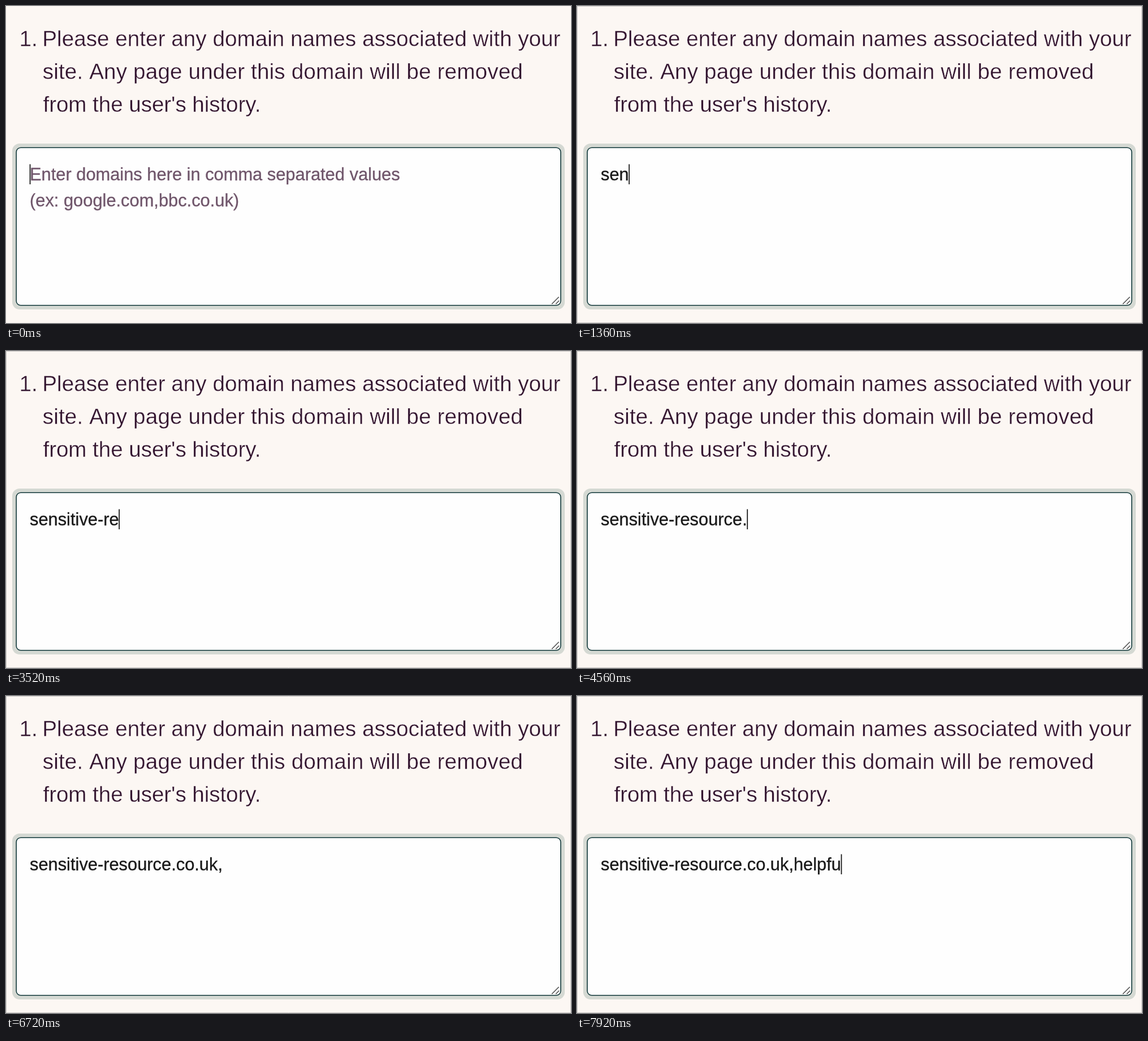
An HTML page with a canvas that plays this animation: 999 by 560 pixels, repeating every 8000 ms.

```html
<!DOCTYPE html>
<html lang="en">
<head>
<meta charset="utf-8">
<title>Domain entry</title>
<style>
  html, body { margin: 0; width: 100%; height: 100%; overflow: hidden; background: #fcf7f3; }
  canvas { display: block; }
</style>
</head>
<body>
<canvas id="stage" width="999" height="560"></canvas>
<script>
const ctx = document.getElementById('stage').getContext('2d');
const LOOP = 8000, BLINK = 480, FOCUS_AT = 240, EDGE_AT = 720;
const PAPER = '#fcf7f3';
const FAMILY = '"Liberation Sans", Arial, sans-serif';
const HEADING_FONT = '38.7px ' + FAMILY;
const FIELD_FONT = '30.83px ' + FAMILY;
const TEXT_X = 42, BASELINE = 308, LINE = 46.3;

const typed = 'sensitive-resource.co.uk,helpfu';
const keyTimes = [
  1120, 1280, 1360, 1600, 1840, 1920, 2080, 2720, 2880, 3200,
  3360, 3520, 3600, 3760, 3840, 4000, 4320, 4400, 4560, 4800,
  4960, 5280, 5600, 5760, 6240, 7200, 7280, 7440, 7600, 7760, 7920
];

// text, x, baseline, tracking
const heading = [
  ['1.', 23.5, 70.5, 0],
  ['Please enter any domain names associated with your', 64.3, 70.5, 0],
  ['site. Any page under this domain will be removed', 64.7, 128.5, 0.13],
  ["from the user's history.", 65.5, 186.5, -0.1]
];

function roundBox(x, y, w, h, r, color) {
  ctx.fillStyle = color;
  ctx.beginPath();
  ctx.roundRect(x, y, w, h, r);
  ctx.fill();
}

// An outline in the paper colour slims the letters; one in their own colour thickens them.
function weightedText(text, x, y, fill, outline, width) {
  ctx.fillStyle = fill;
  ctx.strokeStyle = outline;
  ctx.lineWidth = width;
  ctx.lineJoin = 'round';
  ctx.fillText(text, x, y);
  ctx.strokeText(text, x, y);
}

function drawHeading() {
  ctx.font = HEADING_FONT;
  for (const [text, x, y, tracking] of heading) {
    ctx.letterSpacing = tracking + 'px';
    weightedText(text, x, y, '#32142f', PAPER, 0.4);
  }
  ctx.letterSpacing = '0px';
}

function drawField() {
  roundBox(11, 243, 977, 293, 13, '#d5d9d3');
  roundBox(17.4, 249.4, 964.2, 280.2, 8.6, '#12383a');
  roundBox(19, 251, 961, 277, 7, '#fefefe');
  ctx.strokeStyle = '#4a4a4a';
  ctx.lineWidth = 1.5;
  ctx.beginPath();
  ctx.moveTo(965, 526.5);
  ctx.lineTo(977.5, 514);
  ctx.moveTo(972, 526.5);
  ctx.lineTo(978, 520.5);
  ctx.stroke();
}

function drawEntry(t) {
  const count = keyTimes.filter(k => k <= t).length;
  const text = typed.slice(0, count);
  const write = (line, y, color) => weightedText(line, TEXT_X, y, color, color, 0.35);
  ctx.font = FIELD_FONT;
  if (count) {
    write(text, BASELINE, '#1a1a1a');
  } else {
    write('Enter domains here in comma separated values', BASELINE, '#70566b');
    write('(ex: google.com,bbc.co.uk)', BASELINE + LINE, '#70566b');
  }
  const idle = Math.max(0, t - (count ? keyTimes[count - 1] : FOCUS_AT));
  if (Math.floor(idle / BLINK) % 2 === 0) {
    const x = TEXT_X + ctx.measureText(text).width - 0.3;
    ctx.fillStyle = '#101010';
    ctx.fillRect(x, 279.5, 1.7, 35.5);
  }
}

function draw(t) {
  ctx.fillStyle = PAPER;
  ctx.fillRect(0, 0, 999, 560);
  drawHeading();
  drawField();
  drawEntry(t);
  if (t >= EDGE_AT) {
    ctx.strokeStyle = '#cbc7c5';
    ctx.lineWidth = 1;
    ctx.strokeRect(0.5, 0.5, 998, 559);
  }
}

const start = performance.now();
function tick() {
  draw((performance.now() - start) % LOOP);
  requestAnimationFrame(tick);
}
tick();
</script>
</body>
</html>
```
